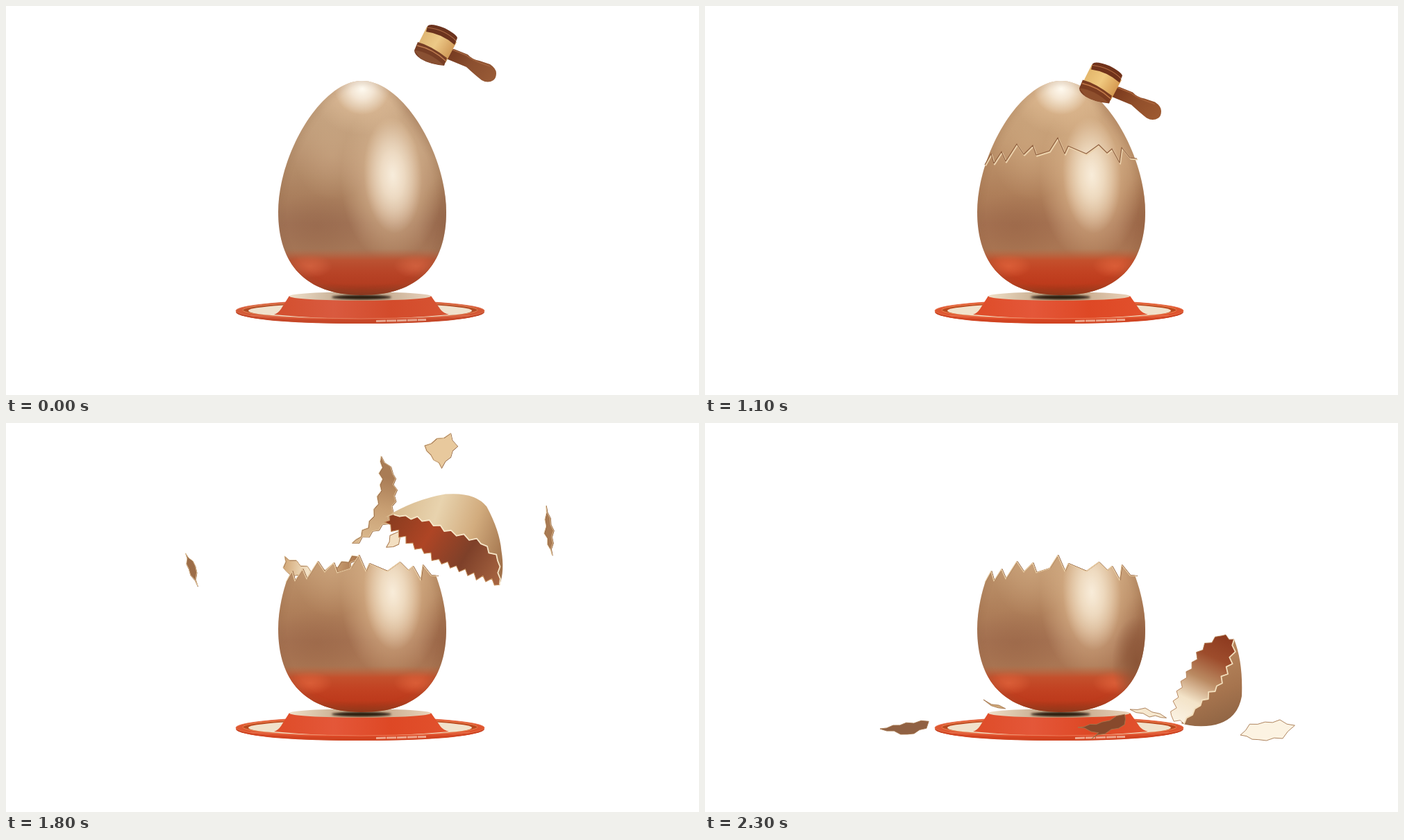
An HTML page that plays this animation: 998x561 px, repeating every 2400 ms.

```html
<!DOCTYPE html>
<html lang="en">
<head>
<meta charset="utf-8">
<title>Hatching egg</title>
<style>
html, body { margin: 0; width: 100%; height: 100%; overflow: hidden; background: #fff; }
svg { display: block; width: 100vw; height: 100vh; }
</style>
</head>
<body>
<svg id="stage" viewBox="0 0 998 561"></svg>
<script>
const EGG = 'M513 108C573 108 634 215 634 297C634 374 593 417 513 417C433 417 392 374 392 297C392 215 453 108 513 108Z';
const RIM = '403,229 412,213 416,227 427,210 433,224 449,199 459,214 472,201 477,215 496,209 508,190 518,213 523,202 549,213 567,200 579,212 586,206 597,226 600,204 612,219 622,220';

// Small seeded generator, so every load draws the same edges.
const random = seed => () => {
  seed = (seed * 16807) % 2147483647;
  return seed / 2147483647;
};
const points = keys => keys.split(' ').map(p => p.split(',').map(Number));

// Turns a few key points into a broken edge whose teeth alternate about it.
function jag(keys, step, depth, seed = 7) {
  const rnd = random(seed * 7919), pts = points(keys), out = [pts[0]];
  let side = 1;
  for (let i = 1; i < pts.length; i++) {
    const [ax, ay] = pts[i - 1], [bx, by] = pts[i];
    const length = Math.hypot(bx - ax, by - ay), n = Math.max(1, Math.round(length / step));
    for (let k = 1; k <= n; k++) {
      const end = i === pts.length - 1 && k === n;
      const off = end ? 0 : side * depth * (.3 + .7 * rnd()) / length;
      side = -side;
      out.push([ax + (bx - ax) * k / n - (by - ay) * off, ay + (by - ay) * k / n + (bx - ax) * off]);
    }
  }
  return out.map(p => p.map(v => v.toFixed(1)).join()).join(' ');
}

const stops = colors => colors.split(' ').map((c, i, all) => `<stop offset="${i / (all.length - 1)}" stop-color="${c}"/>`).join('');
const grad = (id, x1, y1, x2, y2, colors) =>
  `<linearGradient id="${id}" gradientUnits="userSpaceOnUse" x1="${x1}" y1="${y1}" x2="${x2}" y2="${y2}">${stops(colors)}</linearGradient>`;
const glow = (id, color) =>
  `<radialGradient id="${id}"><stop offset="0" stop-color="${color}"/><stop offset=".4" stop-color="${color}" stop-opacity=".68"/><stop offset="1" stop-color="${color}" stop-opacity="0"/></radialGradient>`;
const oval = (x, y, rx, ry, fill, more = '') => `<ellipse cx="${x}" cy="${y}" rx="${rx}" ry="${ry}" fill="${fill}" ${more}/>`;
const poly = (pts, fill, more = '') => `<polygon points="${pts}" fill="${fill}" ${more}/>`;
const line = (pts, color, width, more = '') =>
  `<polyline points="${pts}" fill="none" stroke="${color}" stroke-width="${width}" stroke-linejoin="round" ${more}/>`;
const path = (d, fill, more = '') => `<path d="${d}" fill="${fill}" ${more}/>`;
const edge = (color, width = 1) => `stroke="${color}" stroke-width="${width}" stroke-linejoin="round"`;

const HEM = jag('403,198 440,177 512,169 590,168 624,188', 8, 7, 3);

const defs = `<defs>
  ${grad('shell', 0, 108, 0, 355, '#d3b08b #c9a47d #c19a73 #b78c66 #ad7e5a #a57354 #a97654')}
  ${grad('blush', 0, 350, 0, 417, '#bf613a00 #c2502d #c04223 #bb3b1d #8f3317')}
  ${grad('foot', 390, 0, 636, 0, '#dc4d29 #e2583a #dc4926 #e0522e')}
  ${grad('brim', 331, 0, 689, 0, '#dc5a34 #de4a28 #d84523 #dd5731')}
  ${grad('top', 408, 0, 612, 0, '#efdfc8 #b89a7c #ead2ba')}
  ${grad('band', 600, 40, 640, 66, '#e2b66d #efc981 #d69c55')}
  ${grad('wood', 640, 60, 700, 106, '#77371c #8f4e2b #9c5932')}
  ${grad('hollow', 0, 165, 0, 208, '#5b2a1a #74402a #a3694a')}
  ${grad('plate', 0, 118, 0, 180, '#d3ae84 #c39670 #a8734f')}
  ${grad('ring', 0, 170, 0, 214, '#6d3c25 #a77450 #c49668')}
  ${grad('dome', 660, 165, 790, 275, '#d9bc92 #e8d3af #d1ac7f #a0724c')}
  ${grad('cave', 650, 170, 760, 315, '#8a3c20 #ac4526 #7d402a #a66542')}
  ${grad('bowl', 720, 340, 760, 437, '#b5855d #a5744f #8b6243')}
  ${grad('nest', 745, 305, 685, 432, '#8c3a20 #9c4c2d #b98a63 #f3e3c9 #fbf2e2')}
  ${grad('chip', 560, 60, 515, 140, '#a87c56 #c79f74 #d8b78d')}
  ${grad('fringe', 388, 0, 494, 0, '#d0a778 #f4e3c8 #cba378 #a8754c')}
  ${glow('white', '#fffaf0')}${glow('cream', '#f8ecd9')}${glow('halo', '#e0bc94')}${glow('umber', '#8a5538')}${glow('ember', '#e66a42')}
  <filter id="soft" x="-50%" y="-50%" width="200%" height="200%"><feGaussianBlur stdDeviation="5"/></filter>
  <filter id="haze"><feGaussianBlur stdDeviation="1.5"/></filter>
  <clipPath id="eggClip"><path id="outline" d="${EGG}"/></clipPath>
  <clipPath id="lowClip"><polygon points="385,232 ${RIM} 640,225 640,430 385,430"/></clipPath>
  <clipPath id="capClip"><polygon points="395,60 ${HEM} 640,60" transform="translate(0 39)"/></clipPath>
  <g id="skin" clip-path="url(#eggClip)">
    <rect x="370" y="100" width="290" height="325" fill="url(#shell)"/>
    ${oval(470, 215, 55, 65, 'url(#halo)', 'opacity=".3"')}
    ${oval(448, 318, 70, 48, 'url(#umber)', 'opacity=".28"')}
    ${oval(632, 310, 40, 65, 'url(#umber)', 'opacity=".4"')}
    ${oval(590, 160, 24, 70, 'url(#umber)', 'opacity=".3" transform="rotate(-30 590 160)"')}
    ${oval(556, 248, 74, 122, 'url(#halo)')}
    ${oval(557, 244, 42, 84, 'url(#cream)', 'transform="rotate(-3 557 244)"')}
    <rect x="370" y="350" width="290" height="75" fill="url(#blush)"/>
    ${oval(438, 375, 32, 17, 'url(#ember)', 'opacity=".6"')}
    ${oval(590, 375, 32, 17, 'url(#ember)', 'opacity=".6"')}
    <g id="crown">${oval(513, 124, 72, 62, 'url(#halo)')}${oval(513, 119, 40, 38, 'url(#white)')}</g>
    ${path(EGG, 'none', 'stroke="#8a6040" stroke-width="5" opacity=".3" filter="url(#soft)"')}
  </g>
</defs>`;

const dish = `
  ${oval(510, 441.5, 179, 16.5, '#c5401f')}
  ${oval(510, 439.5, 179, 15.5, 'url(#brim)', edge('#e8724c', .8))}
  ${oval(510, 438.5, 169, 12, '#b9481f', edge('#f0925c', .8))}
  ${oval(510, 439.5, 161, 11, '#f1e2cb')}
  ${path('M335 445Q372 458 510 458Q648 458 685 445Q650 453 510 453Q372 453 335 445Z', '#cf4523')}
  ${path('M408 418L396 437Q392 443 386 445Q510 457 638 445Q630 443 626 438L612 418Z', 'url(#foot)')}
  ${path('M352 446Q510 456 668 446', 'none', edge('#ec7f5c', .8))}
  ${path('M533 454.5L605 452.5', 'none', 'stroke="#ecA58c" stroke-width="3" stroke-dasharray="14 1"')}
  ${oval(510, 418.5, 102, 6.3, 'url(#top)')}
  ${oval(512, 420, 43, 3.2, '#2c1a10', 'filter="url(#haze)"')}`;

const hammer = `
  ${path('M636 63Q642 60 650 64L665 70Q671 77 682 79L697 84Q706 90 706 97Q706 104 702 107Q694 112 685 107Q676 100 663 88L634 76Z', 'url(#wood)')}
  ${path('M643 63L663 71Q672 79 697 87', 'none', edge('#a8633b', 1.5))}
  ${path('M606 30L649 52L633 82L592 58Z', 'url(#band)')}
  ${path('M607 29Q611 24 632 32Q649 41 650 46L646 56Q628 40 605 37Z', '#6f321b')}
  ${path('M607 31Q632 34 648 50', 'none', edge('#b16b42', 1.2))}
  ${path('M593 52Q612 57 635 75L631 86Q610 84 597 76Q588 70 588 64Z', '#7b3d22')}
  ${path('M592 57Q615 62 633 79', 'none', edge('#c47c4c', 1.3))}
  ${path('M588 64Q610 66 630 85Q610 84 597 76Z', '#8d4f2e')}`;

const seamL = jag('411,178 423,150 445,137 475,130 506,125 511,138', 9, 2.5, 4);
const seamR = jag('511,138 518,124 540,120 558,116 586,123', 8, 3, 9);
const lid = `
  <g transform="translate(0 -39)" clip-path="url(#capClip)"><use href="#skin"/></g>
  ${poly(seamL + ' ' + jag('511,150 495,171 452,172 411,186', 7, 3.5, 5), 'url(#plate)', edge('#8c5838', .8))}
  ${poly(seamR + ' ' + jag('590,150 594,166 545,164 516,152', 8, 4, 6), 'url(#plate)', edge('#9a6744', .8))}
  ${line(seamL, '#f2dfc0', 1.5)}${line(seamR, '#f2dfc0', 1.5)}
  ${line(jag('587,125 600,145 621,186', 9, 1.5), '#e4c49a', 1.2)}
  ${line(HEM, '#633420', 1.8)}`;

const rimFlying = jag('761,318 772,285 760,252 722,222 692,190 655,169', 9, 3.5, 2);
const capFlying = `
  ${poly(jag('628,209 640,196 653,193 648,212 628,209', 9, 2), '#f3dfc2', edge('#a8794f'))}
  ${poly(jag('655,166 640,176 660,212 690,254 725,287 761,318', 7, 5, 5) + ' ' + rimFlying, 'url(#cave)', edge('#c8925f'))}
  ${path(`M642 168Q690 159 735 168Q776 180 784 206Q789 245 781 273Q775 302 761 318L${rimFlying}Z`, 'url(#dome)')}
  ${line(rimFlying, '#f6e6c9', 1.8)}`;

const rimLanded = jag('762,312 758,347 738,380 712,406 690,434', 8, 4, 3);
const capLanded = `
  ${path('M762 312Q775 345 773 394Q766 434 722 437Q698 438 686 433L730 370Z', 'url(#bowl)')}
  ${poly(rimLanded + ' ' + jag('690,434 670,424 690,366 715,326 743,305 762,312', 8, 4.5, 4), 'url(#nest)', edge('#b07c52', .9))}
  ${line(rimLanded, '#f3dfbe', 1.8)}`;

// Outlines in flight (at the top of the arc) and at rest, with sideways speed, rise and spin.
const shards = {
  left: { fly: '207,170 228,180 242,206 220,189 207,170', fill: '#9b6d49', depth: 1.5, vx: -45, vy: 15, spin: -25,
    land: '252,441 290,433 322,429 318,440 292,450 252,441', rest: '#8f6144' },
  middle: { fly: '570,33 580,62 573,94 550,128 492,142 526,119 554,80 570,33', fill: 'url(#chip)', depth: 3, vx: 12, vy: 20, spin: 18,
    land: '537,439 572,432 604,419 605,435 556,455 566,446 537,439', rest: '#86492d' },
  high: { fly: '647,-8 648,8 657,31 689,12 687,-8 647,-8', fill: '#e7c99e', depth: 2, vx: 40, vy: 5, spin: 25,
    land: '612,413 634,412 665,424 640,423 612,413', rest: '#f6e8d0' },
  right: { fly: '868,103 862,140 845,171 850,138 868,103', fill: '#a87b54', depth: 1.5, vx: 77, vy: 20, spin: 25,
    land: '771,450 785,435 828,429 849,437 831,454 797,458 771,450', rest: '#fcf3e2' },
  back: { fly: '388,190 430,205 465,195 493,175 478,203 440,220 392,214 388,190', fill: 'url(#fringe)', depth: 3.5, vx: -12, vy: 30, spin: -7,
    land: '401,399 413,405 433,411 412,409 401,399', rest: '#cfaa7c' }
};
const shard = name => {
  const { fly, fill, depth, land, rest } = shards[name], shape = jag(fly, 9, depth);
  return `<g id="${name}Fly">${poly(shape, fill, edge('#8a5a38', .9))}${line(shape, '#ecd2aa', .7, 'transform="translate(-.6 -.6)"')}</g>` +
    `<g id="${name}Land">${poly(jag(land, 10, 1.5), rest, edge('#a4764e', .9))}</g>`;
};

const stage = document.getElementById('stage');
stage.innerHTML = `${defs}
  ${dish}
  ${shard('back')}
  <g id="inside">
    ${poly('530,168 616,166 619,188 ' + jag('610,206 560,203 520,204', 9, 4), 'url(#hollow)')}
    ${poly('437,172 550,163 ' + jag('551,176 530,187 510,198 487,214 470,203 445,201 437,174', 8, 2.5), 'url(#ring)', edge('#7a4a2e', .9))}
  </g>
  <use id="whole" href="#skin"/>
  <g id="lower"><g clip-path="url(#lowClip)"><use href="#skin"/>
    <g clip-path="url(#eggClip)">${oval(0, 0, 36, 66, 'url(#umber)', 'id="shade"')}</g></g>
    ${line(RIM, '#8f6040', 1, 'transform="translate(1 .5)"')}${line(RIM, '#e9cda4', 1.2, 'transform="translate(0 1)"')}</g>
  <g id="crack">${line(RIM, '#ecd3ae', 2, 'transform="translate(1 1.5)"')}${line(RIM, '#8f6040', 1.2)}</g>
  <g id="lid">${lid}</g>
  ${['left', 'middle', 'high', 'right'].map(shard).join('')}
  <g id="capFlying">${capFlying}</g>
  <g id="capLanded">${capLanded}</g>
  <g id="hammer">${hammer}</g>`;

const el = id => document.getElementById(id);
const show = (id, on) => el(id).setAttribute('visibility', on ? 'visible' : 'hidden');
const place = (id, x, y, turn = 0, cx = 0, cy = 0) =>
  el(id).setAttribute('transform', `translate(${x} ${y}) rotate(${turn} ${cx} ${cy})`);
const centre = keys => [0, 1].map(i => points(keys).reduce((sum, p, k, all) => sum + p[i] / all.length, 0));
const clamp = v => Math.min(1, Math.max(0, v));

const TAU = Math.PI * 2;
const HIT = 11, BURST = 12, APEX = 19, LANDED = 22;
// Sideways travel: thrown hard, then stopped by the air.
const drag = u => (1 - 40 ** -u) / 39;

function draw(s) {
  // Two rocking swings that grow until the blow.
  const lean = s < HIT ? (1.7 + .18 * s) * Math.sin(TAU * 2 * s / HIT) : 0;
  for (const id of ['outline', 'crown']) place(id, 0, 0, lean, 513, 300);

  const hit = s <= BURST ? clamp((s - 8) / 3) ** 2 : 1 - .3 * (s - BURST);
  const sway = 3.4 * (1 - Math.cos(TAU * s / 8.6)) * (1 - hit);
  place('hammer', -49 * hit - sway * .15, 54.5 * hit - sway * .25, sway, 620, 55);
  show('hammer', s < 15);

  show('whole', s <= BURST);
  show('crack', s >= HIT && s <= BURST);
  show('lower', s > BURST);
  show('inside', s > 13 && s < 17);

  const lift = 39 * Math.max(0, (s - BURST) / 4) ** 2, tip = Math.max(0, s - 16);
  show('lid', s > BURST && s < 18);
  place('lid', 30 * tip, 39 - lift, 10 * tip, 513, 130);

  const u = s - APEX, flying = u >= -1 && s < LANDED, landed = s >= LANDED;
  const drop = landed ? 23 - s : 0;
  show('capFlying', flying);
  place('capFlying', 75 * drag(u), 58 * u - 5 * u * u, 21 * u, 715, 240);
  show('capLanded', landed);
  place('capLanded', 0, -10 * drop, -7 * drop, 720, 380);
  show('shade', u >= 0);
  place('shade', 632 - 2.5 * u, 265 + 20 * u);

  for (const [name, { fly, land, vx, vy, spin }] of Object.entries(shards)) {
    show(name + 'Fly', flying);
    place(name + 'Fly', vx * drag(u), vy * u + 38 * u * u, spin * u, ...centre(fly));
    show(name + 'Land', landed);
    place(name + 'Land', 0, -14 * drop, -8 * drop, ...centre(land));
  }
  stage.style.filter = `saturate(${.92 + .1 * clamp((s - 4) / 7)})`;
}

const start = performance.now();
let last = -1;
function tick() {
  const step = Math.floor((performance.now() - start) % 2400 / 100);
  if (step !== last) draw(last = step);
  requestAnimationFrame(tick);
}
tick();
</script>
</body>
</html>
```
